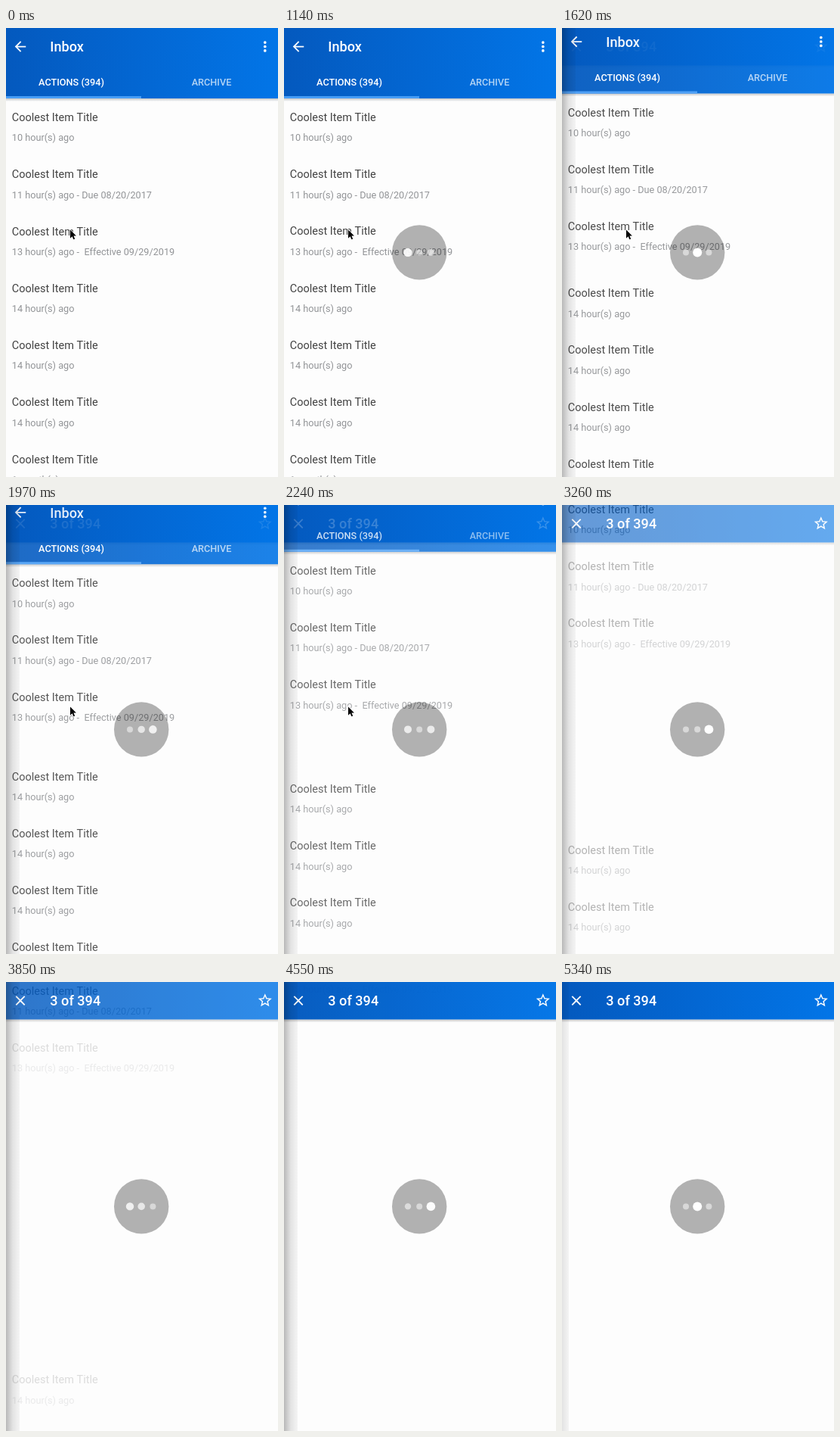
An HTML page with a canvas that plays this animation: 360x593 px, repeating every 5440 ms.

```html
<!DOCTYPE html>
<html lang="en">
<head>
<meta charset="utf-8">
<title>Inbox transition</title>
<style>
  html, body { margin: 0; width: 100%; height: 100%; overflow: hidden; background: #fdfdfd; }
  canvas { display: block; width: 360px; height: 593px; }
</style>
</head>
<body>
<canvas id="stage" width="360" height="593"></canvas>
<script>
const W = 360, H = 593, LOOP = 5440;
const PAPER = '#fdfdfd';
const TAP = 1050, MOVE = 1100, FADE = 3800, EDGE_IN = 1440, EDGE_BACK = 5340;
const PULSE = 1240, PULSE_PEAK = 1620;

const stage = document.getElementById('stage').getContext('2d');
const detailCanvas = Object.assign(document.createElement('canvas'), { width: W, height: H });
const detail = detailCanvas.getContext('2d');

const clamp = (v, lo = 0, hi = 1) => Math.min(hi, Math.max(lo, v));

// Screen refresh moments: [first, last, count]
const refreshes = [
  [0, 0, 1], [1050, 1290, 4], [1440, 1440, 1], [1620, 2150, 7], [2240, 2680, 6],
  [2800, 3260, 6], [3380, 3850, 6], [3940, 4460, 6], [4550, 5040, 8],
  [5100, 5160, 2], [5340, 5340, 1]
].flatMap(([first, last, n]) =>
  Array.from({ length: n }, (_, i) => first + (n > 1 ? (last - first) * i / (n - 1) : 0)));

const icons = {
  back: new Path2D('M20 11H7.83l5.59-5.59L12 4l-8 8 8 8 1.41-1.41L7.83 13H20z'),
  close: new Path2D('M19 6.41L17.59 5 12 10.59 6.41 5 5 6.41 10.59 12 5 17.59 6.41 19 12 13.41 17.59 19 19 17.59 13.41 12z'),
  star: new Path2D('M22 9.24l-7.19-.62L12 2 9.19 8.63 2 9.24l5.46 4.73L5.82 21 12 17.27 18.18 21l-1.63-7.03L22 9.24zM12 15.4l-3.76 2.27 1-4.28-3.32-2.88 4.38-.38L12 6.1l1.71 4.04 4.38.38-3.32 2.88 1 4.28L12 15.4z')
};
const pointer = new Path2D('M0 0V11.2L2.6 8.8L4.4 12.8L6.2 12L4.4 8.1H7.9Z');

const items = [
  '10 hour(s) ago',
  '11 hour(s) ago - Due 08/20/2017',
  '13 hour(s) ago -  Effective 09/29/2019',
  '14 hour(s) ago',
  '14 hour(s) ago',
  '14 hour(s) ago',
  '1 month(s) ago'
];

function text(c, str, x, y, size, color, weight = 400, align = 'left') {
  c.font = `${weight} ${size}px Roboto, sans-serif`;
  c.textAlign = align;
  c.fillStyle = color;
  c.fillText(str, x, y);
}

function icon(c, path, x, y) {
  c.save();
  c.translate(x, y);
  c.scale(0.907, 0.907);
  c.translate(-12, -12);
  c.fillStyle = '#fff';
  c.fill(path, 'evenodd');
  c.restore();
}

function disc(c, x, y, r, color) {
  c.fillStyle = color;
  c.beginPath();
  c.arc(x, y, r, 0, Math.PI * 2);
  c.fill();
}

function gradientRect(c, x, y, w, h, line, stops) {
  const g = c.createLinearGradient(...line);
  stops.forEach(([at, color]) => g.addColorStop(at, color));
  c.fillStyle = g;
  c.fillRect(x, y, w, h);
}

function appBar(c, height) {
  gradientRect(c, 0, height, W, 4, [0, height, 0, height + 4],
    [[0, 'rgba(0,0,0,.22)'], [1, 'rgba(0,0,0,0)']]);
  gradientRect(c, 0, 0, W, height, [0, 0, W, 0],
    [[0, '#0459be'], [0.5, '#0367d3'], [1, '#0275e7']]);
}

function drawInbox(c, shift) {
  c.fillStyle = PAPER;
  c.fillRect(0, 0, W, H);
  items.forEach((note, i) => {
    const y = 75.25 * i + (i < 3 ? -shift : shift);
    text(c, 'Coolest Item Title', 7.8, y + 123, 14.5, '#424242');
    text(c, note, 7.8, y + 149.3, 12.7, '#929497');
  });

  c.save();
  c.translate(0, -shift);
  appBar(c, 93);
  c.fillStyle = '#479df6';
  c.fillRect(0, 90, 179, 3);
  icon(c, icons.back, 19, 24.6);
  text(c, 'Inbox', 58.3, 31.4, 18.1, '#fff', 500);
  for (let i = -1; i <= 1; i++) disc(c, 342.8, 24.5 + 5.45 * i, 1.85, '#fff');
  text(c, 'ACTIONS (394)', 86.5, 76.4, 12.7, '#fff', 500, 'center');
  text(c, 'ARCHIVE', 272, 76.4, 12.7, 'rgba(255,255,255,.7)', 500, 'center');
  c.restore();
}

function drawDetail(c) {
  c.fillStyle = PAPER;
  c.fillRect(0, 0, W, H);
  appBar(c, 49.5);
  icon(c, icons.close, 19, 24.6);
  text(c, '3 of 394', 58.3, 31.4, 18.1, '#fff', 500);
  icon(c, icons.star, 342.8, 24.2);
}

function drawEdgeShadow(c, t) {
  if (t < EDGE_IN) return;
  const back = t < EDGE_BACK ? 0 : 9;
  gradientRect(c, 0, 0, 18 - back, H, [-back, 0, 18 - back, 0],
    [[0, 'rgba(0,0,0,.27)'], [0.5, 'rgba(0,0,0,.1)'], [1, 'rgba(0,0,0,.035)']]);
}

function drawSpinner(c, t) {
  if (t < TAP) return;
  disc(c, 179.2, 296.4, 36.2, 'rgba(0,0,0,.3)');
  for (let i = -1; i <= 1; i++) {
    const turn = (t - PULSE_PEAK) / PULSE - i / 3;
    const glow = clamp(1 - 3 * Math.abs(turn - Math.round(turn)));
    disc(c, 179.2 + 15.2 * i, 296.4, 4 + 2 * glow, `rgba(255,255,255,${0.5 + 0.5 * glow})`);
  }
}

function drawPointer(c, t) {
  const travel = clamp((t - 2420) / 260, 0, 10) ** 2;
  if (t >= 3100) return;
  c.save();
  c.translate(85 - 11 * travel, 266.5 + 4 * travel);
  c.lineWidth = 1.4;
  c.strokeStyle = '#fff';
  c.stroke(pointer);
  c.fillStyle = '#000';
  c.fill(pointer);
  c.restore();
}

function render(now) {
  const clock = now % LOOP;
  const t = refreshes.filter(at => at <= clock + 0.5).pop();
  const elapsed = Math.max(0, t - MOVE);
  const fade = (1 - Math.cos(Math.PI * clamp(elapsed / FADE))) / 2;

  drawInbox(stage, (0.0049 * elapsed) ** 2);
  drawDetail(detail);
  stage.globalAlpha = fade;
  stage.drawImage(detailCanvas, 0, 0);
  stage.globalAlpha = 1;
  drawEdgeShadow(stage, t);
  drawSpinner(stage, t);
  drawPointer(stage, t);
}

const start = performance.now();
function tick() {
  render(performance.now() - start);
  requestAnimationFrame(tick);
}
tick();
</script>
</body>
</html>
```
